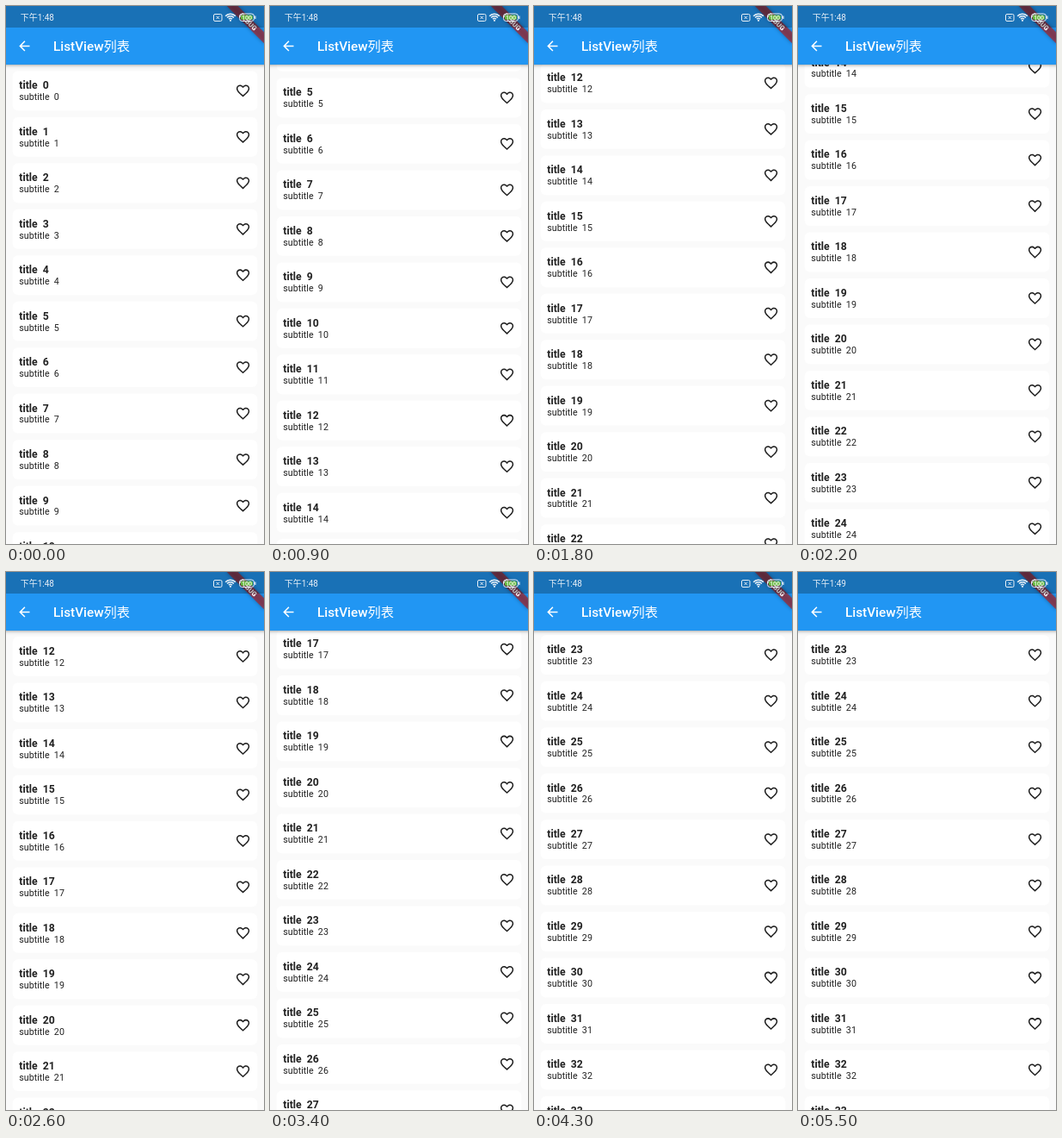
An HTML page with a canvas that plays this animation: 300x624 px, repeating every 5.6 s.

```html
<!DOCTYPE html>
<html lang="zh">
<head>
<meta charset="utf-8">
<title>ListView</title>
<style>
  html, body { margin: 0; width: 100%; height: 100%; overflow: hidden; background: #fafafa; }
  canvas { display: block; width: 300px; height: 624px; }
</style>
</head>
<body>
<canvas id="stage"></canvas>
<script>
const WIDTH = 300, HEIGHT = 624, LOOP = 5600, STEP = 100;
const DP = 2.75 * WIDTH / 1080;            // stage pixels per layout unit
const STATUS = 25 / DP, BAR_BOTTOM = STATUS + 56;
const ROW = 70, GAP = 10, SCREEN_W = WIDTH / DP, SCREEN_H = HEIGHT / DP;
const INK = '#212121';
const FONTS = 'Roboto, "Noto Sans CJK SC", "Noto Sans CJK", sans-serif';

const HEART = new Path2D('M16.5 3c-1.74 0-3.41.81-4.5 2.09C10.91 3.81 9.24 3 7.5 3 4.42 3 2 5.42 2 8.5c0 3.78 3.4 6.86 8.55 11.54L12 21.35l1.45-1.32C18.6 15.36 22 12.28 22 8.5 22 5.42 19.58 3 16.5 3zm-4.4 15.55l-.1.1-.1-.1C7.14 14.24 4 11.39 4 8.5 4 6.5 5.5 5 7.5 5c1.54 0 3.04.99 3.57 2.36h1.87C13.46 5.99 14.96 5 16.5 5c2 0 3.5 1.5 3.5 3.5 0 2.89-3.14 5.74-7.9 10.05z');
const ARROW = new Path2D('M20 11H7.83l5.59-5.59L12 4l-8 8 8 8 1.41-1.41L7.83 13H20v-2z');

// Scroll position: [time in ms, offset in layout units]
const SCROLL = [[0, 0], [600, 300], [700, 300], [1400, 595], [2200, 1015],
                [2600, 840.5], [3400, 1201.5], [4300, 1612.8], [LOOP, 1612.8]];

const canvas = document.getElementById('stage');
const ctx = canvas.getContext('2d');
const density = window.devicePixelRatio || 1;
canvas.width = WIDTH * density;
canvas.height = HEIGHT * density;

// Monotone cubic interpolation, resting at turning points and pauses.
const chord = i => (SCROLL[i + 1][1] - SCROLL[i][1]) / (SCROLL[i + 1][0] - SCROLL[i][0]);
function slope(i) {
  if (i === 0 || i === SCROLL.length - 1) return 0;
  const a = chord(i - 1), b = chord(i);
  return a * b > 0 ? 2 * a * b / (a + b) : 0;
}
function scrollAt(time) {
  let i = 0;
  while (i < SCROLL.length - 2 && time >= SCROLL[i + 1][0]) i++;
  const [t0, y0] = SCROLL[i], [t1, y1] = SCROLL[i + 1];
  const span = t1 - t0, u = (time - t0) / span, v = 1 - u;
  return y0 * (1 + 2 * u) * v * v + y1 * (3 - 2 * u) * u * u
    + span * u * v * (v * slope(i) - u * slope(i + 1));
}

function setScale(scale) {
  ctx.setTransform(density * scale, 0, 0, density * scale, 0, 0);
}
function text(string, x, y, size, weight, color, align = 'left') {
  ctx.font = `${weight} ${size}px ${FONTS}`;
  ctx.textAlign = align;
  ctx.fillStyle = color;
  ctx.fillText(string, x, y);
}
function rect(x, y, w, h, color) {
  ctx.fillStyle = color;
  ctx.fillRect(x, y, w, h);
}
function roundRect(x, y, w, h, r) {
  ctx.beginPath();
  ctx.roundRect(x, y, w, h, r);
}
function icon(path, x, y, color) {
  ctx.save();
  ctx.translate(x, y);
  ctx.fillStyle = color;
  ctx.fill(path);
  ctx.restore();
}
function withShadow(color, offset, blur, draw) {
  ctx.save();
  ctx.shadowColor = color;
  ctx.shadowOffsetY = offset * density;
  ctx.shadowBlur = blur * density;
  draw();
  ctx.restore();
}

function drawRow(index, y) {
  ctx.fillStyle = '#fff';
  roundRect(GAP, y, SCREEN_W - 2 * GAP, ROW - GAP, 8);
  ctx.fill();
  text(`title  ${index}`, 20, y + 27.3, 16, 700, INK);
  text(`subtitle  ${index}`, 20, y + 44.2, 14, 400, INK);
  icon(HEART, SCREEN_W - 44, y + 18, INK);
}

function drawList(offset) {
  const top = BAR_BOTTOM + GAP - offset;
  const first = Math.max(0, Math.floor(offset / ROW) - 1);
  for (let i = first; top + i * ROW < SCREEN_H; i++) drawRow(i, top + i * ROW);
}

function drawAppBar() {
  const bar = () => rect(-20, 0, SCREEN_W + 40, BAR_BOTTOM, '#2196f3');
  withShadow('rgba(0,0,0,.2)', 1.5, 2.5, bar);
  withShadow('rgba(0,0,0,.14)', 2, 4, bar);
  icon(ARROW, 16, STATUS + 16, '#fff');
  text('ListView', 72, STATUS + 35, 20, 500, '#fff');
  text('列表', 72 + ctx.measureText('ListView').width, STATUS + 35, 20, 400, '#fff');
}

function drawBanner() {
  ctx.save();
  ctx.translate(SCREEN_W, 0);
  ctx.rotate(Math.PI / 4);
  withShadow('rgba(0,0,0,.5)', 0, 4.5, () => rect(-40, 28, 80, 12, 'rgba(183,28,28,.63)'));
  text('DEBUG', 0, 37.6, 10.2, 900, '#fff', 'center');
  ctx.restore();
}

function drawStatusBar(time) {
  rect(0, 0, WIDTH, 25, 'rgba(0,0,0,.25)');
  const light = '#e8f0f7';
  text(time < 5200 ? '下午1:48' : '下午1:49', 16.7, 17.2, 10, 400, light);

  ctx.strokeStyle = light;
  ctx.lineWidth = 1;
  roundRect(241.5, 9.5, 9.5, 8, 1.5);
  ctx.moveTo(244.5, 11.7);
  ctx.lineTo(248, 15.2);
  ctx.moveTo(248, 11.7);
  ctx.lineTo(244.5, 15.2);
  ctx.stroke();

  ctx.lineWidth = 1.5;
  for (const radius of [2.6, 5.2, 7.8]) {
    ctx.beginPath();
    ctx.arc(261, 17, radius, -Math.PI * 0.77, -Math.PI * 0.23);
    ctx.stroke();
  }
  ctx.fillStyle = light;
  ctx.beginPath();
  ctx.arc(261, 16.8, 1.1, 0, 2 * Math.PI);
  ctx.fill();

  ctx.lineWidth = 1;
  roundRect(271.5, 9, 17, 8.5, 3);
  ctx.stroke();
  rect(289.3, 11.5, 1.2, 3.5, light);
  ctx.fillStyle = '#62b63a';
  roundRect(273, 10.4, 14, 5.7, 1.8);
  ctx.fill();
  text('100', 280, 15.8, 7, 500, '#fff', 'center');
}

function render(time) {
  setScale(DP);
  rect(0, 0, SCREEN_W, SCREEN_H + 1, '#fafafa');
  drawList(scrollAt(time));
  drawAppBar();
  drawBanner();
  setScale(1);
  drawStatusBar(time);
}

const start = performance.now();
function tick() {
  const elapsed = (performance.now() - start) % LOOP;
  render(Math.floor(elapsed / STEP) * STEP);
  requestAnimationFrame(tick);
}
tick();
</script>
</body>
</html>
```
